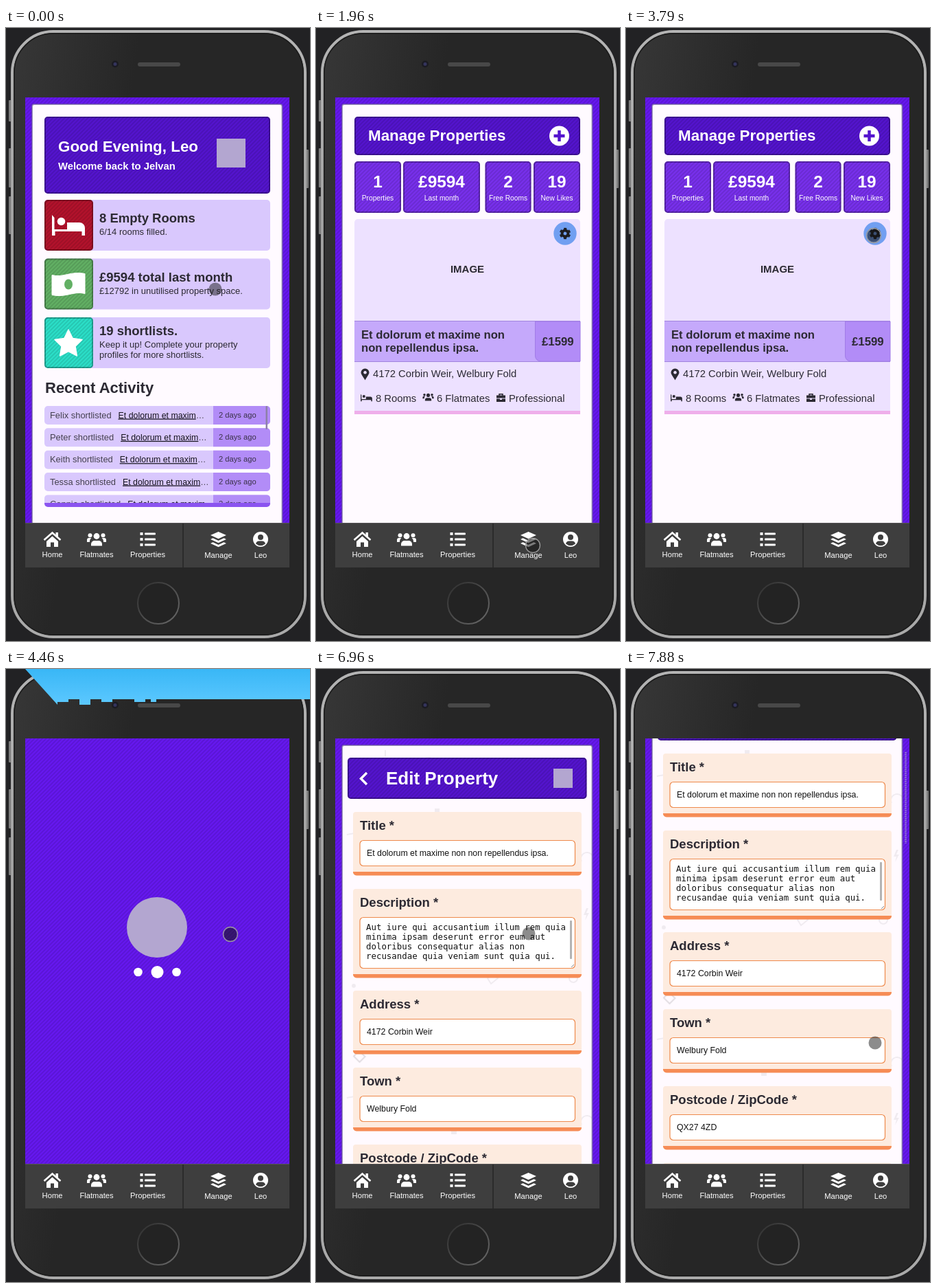
Recreate the animation shown at these times as an HTML page. Size 443 px wide and 892 px high, loop 8 s.

```html
<!DOCTYPE html>
<html lang="en">
<head>
<meta charset="utf-8">
<title>Room letting app</title>
<style>
html, body { margin: 0; width: 100%; height: 100%; overflow: hidden; background: #222224; }
svg { display: block; width: 443px; height: 892px; }
text { font-family: "Liberation Sans", Arial, sans-serif; white-space: pre; }
.mono { font-family: "DejaVu Sans Mono", monospace; }
</style>
</head>
<body>
<svg id="stage" viewBox="0 0 443 892"></svg>
<script>
const INK = '#2c2a33', DEEP = '#5414ce', LILAC = '#d9c8fd', PALE = '#ede1ff',
      MID = '#c5a9fb', STRONG = '#b28cf7', EDGE = '#8b54f0', NAV = '#3e3e3e', LOGO = '#b3a6d0', GREEN = '#62b064';
const STREET = '4172 Corbin Weir', TOWN = 'Welbury Fold', USER = 'Leo';

// Drawing helpers
const rect = (x, y, x2, y2, fill, r = 0, extra = '') =>
  `<rect x="${x}" y="${y}" width="${x2 - x}" height="${y2 - y}" rx="${r}" fill="${fill}" ${extra}/>`;
const striped = (x, y, x2, y2, fill, r = 0, extra = '') =>
  rect(x, y, x2, y2, fill, r) + rect(x, y, x2, y2, 'url(#stripes)', r, extra);
const panel = (x, y, x2, y2, fill) => striped(x, y, x2, y2, fill, 5) +
  rect(x + 1, y + 1, x2 - 1, y2 - 1, 'none', 4, 'stroke="#000" stroke-opacity=".28" stroke-width="2"');
const text = (x, y, size, str, fill = INK, extra = '') =>
  `<text x="${x}" y="${y}" font-size="${size}" fill="${fill}" ${extra}>${str}</text>`;
const bold = (x, y, size, str, fill = INK, extra = '') =>
  text(x, y, size, str, fill, 'font-weight="700" ' + extra);
const MIDDLE = 'text-anchor="middle"';
const circle = (x, y, r, fill, extra = '') => `<circle cx="${x}" cy="${y}" r="${r}" fill="${fill}" ${extra}/>`;
const icon = (name, x, y, fill = '#fff', scale = 1) =>
  `<g transform="translate(${x} ${y}) scale(${scale})" fill="${fill}" stroke="none" color="${fill}">${icons[name]}</g>`;
const path = (d, extra = '') => `<path d="${d}" ${extra}/>`;

const sidePerson = '<circle cx="-9.5" cy="-5.800" r="3"/>' + path('M-14 4V1a3 3 0 0 1 3-3h3.500a7 7 0 0 0-2.500 6z');
const starPoints = Array.from({ length: 10 }, (_, i) => {
  const r = i % 2 ? 10.5 : 21, a = i * Math.PI / 5;
  return `${r * Math.sin(a)},${-r * Math.cos(a)}`;
}).join(' ');
const icons = {
  home: path('M-12 1L0-9.500L12 1', 'fill="none" stroke="currentColor" stroke-width="2.6"') +
    path('M-8.500 3L0-4.500L8.500 3V11H2.500V4.500H-2.500V11H-8.500ZM5-10H8.500V-2L5-5Z'),
  users: '<circle cy="-4.500" r="4.400"/>' + path('M-8 9.500V7a5 5 0 0 1 5-5h6a5 5 0 0 1 5 5v2.500z') +
    sidePerson + `<g transform="scale(-1 1)">${sidePerson}</g>`,
  list: [-8, 0, 8].map(y => rect(-11, y - 2, -7, y + 2, 'currentColor') +
    rect(-4.5, y - 1.5, 11.5, y + 1.5, 'currentColor', 1)).join(''),
  layers: path('M0-11L11.500-6L0-.800L-11.500-6ZM-11.500 0L-8-1.700L0 2L8-1.700L11.500 0L0 5.200Z' +
    'M-11.500 6L-8 4.300L0 8L8 4.300L11.500 6L0 11.200Z'),
  user: circle(0, 0, 11, 'currentColor') + circle(0, -3, 4, NAV) + path('M-7 6.500Q-6 2.500-2 2.500H2Q6 2.500 7 6.500Q0 12-7 6.500Z', `fill="${NAV}"`),
  bed: path('M-24-15v30h4.500v-6h39v6h4.500v-11a8 8 0 0 0-8-8h-18v10h-18.500v-17z') + circle(-10.5, -5.5, 5.8, 'currentColor'),
  note: path('M-24-13.500C-8-9 4-20 24-15.500V13.500C8 9-4 20-24 15.500Z', 'stroke="currentColor" stroke-linejoin="round"') +
    `<ellipse rx="6" ry="7.400" fill="${GREEN}"/>`,
  star: `<polygon points="${starPoints}" stroke="currentColor" stroke-width="1.5" stroke-linejoin="round"/>`,
  gear: '<g transform="rotate(13.500)">' + circle(0, 0, 4.4, 'none', 'stroke="currentColor" stroke-width="4"') +
    circle(0, 0, 6.6, 'none', 'stroke="currentColor" stroke-width="3.200" stroke-dasharray="3.800 3.110"') + '</g>',
  pin: path('M0 8.500C-2 5-6-.500-6-2.500a6 6 0 0 1 12 0C6-.500 2 5 0 8.500ZM0-5a2.300 2.300 0 1 0 .1 0z', 'fill-rule="evenodd"'),
  bag: path('M-6.500-3.500H6.500V.500H-6.500ZM-6.500 1.500H-1.500V3H1.500V1.500H6.500V6H-6.500Z') +
    path('M-2.500-3V-5.200H2.500V-3', 'fill="none" stroke="currentColor" stroke-width="1.500"')
};

// Faint confetti that repeats down the page
const confetti = `<g fill="none" stroke="#000" stroke-opacity=".06" stroke-width="2">` +
  circle(164, 138, 9, 'none') + circle(375, 450, 6, 'none') +
  path('M101 118v10M241 156l15 10M343 211l4 18M45 241l11-2M387 280a9 9 0 1 1 17-3') +
  path('M63 172l8 9l-8 8l-8-8zM257 226l9 11l-9 12l-8-12zM107 256l15 9l-14 11zM360 140l7 16l-13 2zM257 442l8 8l-10 8l-5-8zM62 556l10 8l-8 8l-9-9z') +
  `<g fill="#000" fill-opacity=".06" stroke="none">${rect(173, 203, 180, 210, '#000')}${rect(197, 287, 205, 294, '#000')}` +
  circle(314, 285, 2.5, '#000') + circle(55, 461, 3, '#000') + path('M394 348l-4 10h4l-2 8l6-11h-4l3-7z') + '</g></g>';

const card = rect(38, 111, 402.5, 2000, '#fffaff', 3, 'stroke="#6b5a9c" stroke-opacity=".65" stroke-width="2"');

const summary = (y, colour, glyph, glyphY, title, lines) =>
  rect(56, y, 385, y + 74, LILAC, 5) + panel(56, y, 127, y + 74, colour) + icon(glyph, 91, glyphY) +
  bold(136, y + (lines.length > 1 ? 26 : 33), 18.5, title) +
  lines.map((s, i) => text(136, y + (lines.length > 1 ? 44 : 51) + i * 15, 13, s)).join('');

const activity = (name, i) => {
  const y = 550 + i * 32.35;
  return rect(56, y, 385, y + 27, LILAC, 5) + path(`M302 ${y}h78a5 5 0 0 1 5 5v17a5 5 0 0 1-5 5h-78z`, `fill="${STRONG}"`) +
    text(64, y + 17.5, 12.9, `${name} shortlisted<tspan dx="10" font-size="12.350" text-decoration="underline" fill="#15131c">Et dolorum et maxim</tspan><tspan font-size="12.350">…</tspan>`, '#45414f') +
    text(310, y + 16.5, 11.2, '2 days ago', '#3a3248');
};

const homePage = card + panel(56, 129, 385, 241, DEEP) +
  bold(76, 180, 22.4, `Good Evening, ${USER}`, '#fff') + bold(76, 206, 14.8, 'Welcome back to Jelvan', '#fff') +
  rect(307, 161, 349, 203, LOGO) +
  summary(250, '#b3122c', 'bed', 287, '8 Empty Rooms', ['6/14 rooms filled.']) +
  summary(335.5, GREEN, 'note', 373, '£9594 total last month', ['£12792 in unutilised property space.']) +
  summary(421, '#2bdfc8', 'star', 460, '19 shortlists.', ['Keep it up! Complete your property', 'profiles for more shortlists.']) +
  bold(57, 531, 22, 'Recent Activity') +
  `<g clip-path="url(#listClip)">${['Felix', 'Peter', 'Keith', 'Tessa', 'Connie'].map(activity).join('')}</g>` +
  path('M56 691H385V692a5 5 0 0 1-5 5H61a5 5 0 0 1-5-5z', `fill="${EDGE}"`) +
  rect(378.5, 550, 381, 584, '#8d80a8', 1, 'id="listBar"');

const stat = (x, x2, value, label) => panel(x, 194, x2, 269, '#7830ec') +
  bold((x + x2) / 2, 232, 24.4, value, '#fff', MIDDLE) + text((x + x2) / 2, 251, 10.2, label, '#fff', MIDDLE);

const managePage = card + panel(56, 129, 385, 185, DEEP) + bold(76, 164, 22.4, 'Manage Properties', '#fff') +
  circle(354.5, 157, 14.5, '#fff') + path('M354.500 149v16M346.500 157h16', `stroke="${DEEP}" stroke-width="4.500"`) +
  stat(56, 124, 1, 'Properties') + stat(127, 239, '£9594', 'Last month') +
  stat(246.5, 313.5, 2, 'Free Rooms') + stat(317, 385, 19, 'New Likes') +
  rect(56, 278, 385, 440, PALE, 5) + bold(220.5, 356, 15, 'IMAGE', INK, MIDDLE) +
  circle(363, 299, 16.7, '#719ff1') + icon('gear', 363, 299, '#1d1d22') +
  rect(56, 426, 385, 557, PALE) + rect(56, 426.5, 385, 485.5, MID) +
  path('M56 426.500H385M56 485.500H385', 'stroke="#a184dd"') +
  path('M319.500 427H385V485H327.500a8 8 0 0 1-8-8z', `fill="${STRONG}" stroke="#a07ce6"`) +
  bold(66, 452, 16.65, 'Et dolorum et maxime non') + bold(66, 471, 16.65, 'non repellendus ipsa.') +
  bold(329, 462, 16.8, '£1599') +
  icon('pin', 71.5, 504, INK) + text(83, 508, 14.8, `${STREET}, ${TOWN}`) +
  icon('bed', 73.5, 538, INK, .35) + text(87, 544, 14.8, '8 Rooms') +
  icon('users', 163.5, 537, INK, .58) + text(176, 544, 14.8, '6 Flatmates') +
  icon('bag', 269.5, 538, INK) + text(281, 544, 14.8, 'Professional') +
  rect(56, 557, 385, 562, '#efaeea');

const splashPage = circle(220, 376, 44, LOGO) +
  [0, 1, 2].map(i => circle(192.5 + i * 28, 441, 6, '#fff', 'class="dot"')).join('');

const chip = (x, x2) => rect(x, 390, x2, 424, '#f5c9fc', 3) + rect(x, 390, x + 3, 424, '#d444dc', 1);

const viewPage = card + rect(37, 110, 404, 312, PALE, 3) + `<g clip-path="url(#photoClip)">${confetti}</g>` +
  rect(37, 311.5, 404, 314.5, MID) + text(220.5, 215, 14.7, 'IMAGE', INK, MIDDLE) +
  circle(378, 134.5, 16.5, '#719ff1') + icon('gear', 378, 134.5) +
  rect(56, 329, 385, 446, MID, 5) + bold(66, 362, 21.7, '£1599 per Month') + text(242, 360, 11.15, '( +£864 deposit )') +
  chip(65, 184) + chip(194, 283) + chip(292, 366) +
  text(76, 412, 12.9, 'Ages:') + path('M112.500 405h8l-4 4.500zM168.500 410h8l-4-4.500z', `fill="${INK}"`) +
  text(125, 412, 12.9, '47 - 49') + text(204, 412, 12.9, 'Flatmates: 6') + text(302, 412, 12.9, 'Rooms: 8') +
  rect(56, 442, 385, 526, STRONG) + rect(56, 442, 385, 444, '#9769f1') + rect(56, 477, 385, 478, '#b896f8') +
  text(65.5, 465, 14.8, 'Mostly Professional House') + text(65.5, 498, 14.8, 'Mixed Household: 3 Men · 3 Women') +
  rect(56, 520, 385, 526, EDGE) + rect(56, 540, 385, 545, EDGE) +
  rect(56, 545, 385, 579, MID) + bold(65.5, 571, 24, 'About') + rect(56, 579, 385, 715, STRONG) +
  text(65.5, 601, 18.5, 'Et dolorum et maxime non non') + text(65.5, 616, 18.5, 'repellendus ipsa.') +
  ['Aut iure qui accusantium illum rem quia', 'minima ipsam deserunt error eum aut',
   'doloribus consequatur alias non recusandae', 'quia veniam sunt quia qui.']
    .map((s, i) => text(65.5, 648 + i * 14.7, 14.8, s)).join('') +
  rect(56, 715, 385, 721, '#9769f1');

const field = (y, label, value, inner = 37) => {
  const bottom = y + inner + 50;
  return path(`M54 ${y + 4}a4 4 0 0 1 4-4H383a4 4 0 0 1 4 4V${bottom}H54z`, 'fill="#fdebdf"') +
    path(`M54 ${bottom}H387a5 5 0 0 1-5 5.500H59a5 5 0 0 1-5-5.500z`, 'fill="#f68c55"') +
    bold(64, y + 26, 18.5, label + ' *') +
    rect(64, y + 41.5, 377.5, y + 41.5 + inner, '#fff', 5, 'stroke="#ee8a4c" stroke-width="1.200"') +
    (Array.isArray(value)
      ? value.map((s, i) => text(73, y + 60 + i * 14, 12.4, s, '#111', 'class="mono"')).join('') +
        rect(370, y + 46, 373, y + 102, '#b3b3b3', 1) + path(`M372 ${y + 114}l4-4`, 'stroke="#888"')
      : text(74, y + 64, 12.35, value, '#111'));
};

const editPage = card + `<g clip-path="url(#cardClip)">${confetti}<g transform="translate(0 383)">${confetti}</g></g>` +
  panel(46, 129, 394.5, 189, DEEP) + path('M74 151l-8.500 8.500l8.500 8.500', 'fill="none" stroke="#fff" stroke-width="3.500"') +
  bold(102, 168, 26, 'Edit Property', '#fff') + rect(346, 145, 374, 173, LOGO) +
  field(208, 'Title', 'Et dolorum et maxime non non repellendus ipsa.') +
  field(320, 'Description', ['Aut iure qui accusantium illum rem quia', 'minima ipsam deserunt error eum aut',
    'doloribus consequatur alias non', 'recusandae quia veniam sunt quia qui.'], 74) +
  field(468, 'Address', STREET) + field(580, 'Town', TOWN) + field(692, 'Postcode / ZipCode', 'QX27 4ZD') +
  field(803.5, 'Country', '');

const tab = (x, glyph, label, dy = 0) => icon(glyph, x, 744) + text(x, 770 + dy, 11.2, label, '#fff', MIDDLE);

const pages = { home: homePage, manage: managePage, splash: splashPage, view: viewPage, edit: editPage };

const clip = (id, x, y, x2, y2) => `<clipPath id="${id}">${rect(x, y, x2, y2, '#000')}</clipPath>`;
document.getElementById('stage').innerHTML = `<defs>
  <pattern id="stripes" width="4" height="4" patternUnits="userSpaceOnUse" patternTransform="rotate(45)">${rect(0, 0, 2, 4, '#000', 0, 'opacity=".11"')}</pattern>
  <linearGradient id="metal" x2="0" y2="1"><stop stop-color="#b4b4b4"/><stop offset=".5" stop-color="#969696"/><stop offset="1" stop-color="#aaa"/></linearGradient>
  <linearGradient id="body" x2=".8" y2=".25"><stop stop-color="#373737"/><stop offset=".5" stop-color="#262626"/></linearGradient>
  <linearGradient id="button" y2="1"><stop stop-color="#2e2e2e"/><stop offset="1" stop-color="#6a6a6a"/></linearGradient>
  <linearGradient id="sky" x2="0" y2="1"><stop stop-color="#39b7f6"/><stop offset="1" stop-color="#5cc8ff"/></linearGradient>
  ${clip('screen', 28, 101, 413, 720)}${clip('listClip', 56, 549, 386, 691)}
  ${clip('photoClip', 38, 111, 403, 311)}${clip('cardClip', 38, 111, 402, 2000)}</defs>` +
  rect(0, 0, 443, 892, '#222224') +
  [[105, 136], [175, 232], [245, 300]].map(([a, b]) => rect(4, a, 8, b, '#7c7c7c', 1)).join('') + rect(436, 177, 441, 233, '#7c7c7c', 1) +
  rect(9, 5, 436, 886, 'url(#body)', 60, 'stroke="url(#metal)" stroke-width="4"') +
  rect(12, 8, 433, 883, 'none', 57, 'stroke="#1c1c1c" stroke-width="1.500"') +
  circle(159, 52.5, 5, '#1b1b22') + circle(159, 52.5, 2.5, '#34345c') + rect(192, 50, 254, 56, '#484848', 3) +
  circle(222, 837, 30, '#232323', 'stroke="url(#button)" stroke-width="2"') +
  `<g clip-path="url(#screen)">${striped(28, 101, 413, 720, '#6618f0')}` +
  Object.entries(pages).map(([id, body]) => `<g id="${id}">${body}</g>`).join('') +
  path('M407.500 0v133', 'id="pageBar" stroke="#a79bd0" stroke-width="2.500" stroke-dasharray="2 1" opacity=".7"') + '</g>' +
  rect(28, 720, 413, 785, NAV) + rect(257, 720, 259, 785, '#2b2b2b') + rect(28, 720, 413, 721, '#555') +
  tab(67.5, 'home', 'Home') + tab(132, 'users', 'Flatmates') + tab(206.5, 'list', 'Properties') +
  tab(309.5, 'layers', 'Manage', 1) + tab(371, 'user', USER, 1) +
  path('M28 0H443V44H219V48H211V44H203V48H187V44H155V48H139V44H123V52H107V44H91V48H75V52Z', 'id="flash" fill="url(#sky)"') +
  `<g id="cursor">${circle(0, 0, 9.5, '#191919', 'fill-opacity=".5"')}` +
  circle(0, 0, 10.5, '#000', 'id="ring" fill-opacity=".12" stroke="#999" stroke-width="1.300"') + '</g>';

// Pointer stops: time, x, y
const stops = [[0, 305, 380], [235, 305, 380], [262, 316, 381], [290, 302, 380], [480, 302, 380], [500, 303, 376],
  [640, 303, 376], [1000, 287, 669], [1669, 287, 669], [1670, 316, 753], [2190, 316, 753], [2670, 262, 393],
  [3270, 262, 393], [3790, 361, 302], [4100, 361, 302], [4460, 327, 386], [4750, 309, 472], [5360, 309, 472],
  [5830, 372, 135], [6130, 372, 135], [6880, 310, 385], [6960, 310, 385], [7250, 325, 400], [7410, 325, 400],
  [7880, 363, 544], [8000, 363, 544]];
const schedule = [[1920, 'home'], [3960, 'manage'], [4720, 'splash'], [6210, 'view'], [8000, 'edit']];

const $ = id => document.getElementById(id);
const dots = document.querySelectorAll('.dot');
const show = (id, on) => { $(id).style.display = on ? '' : 'none'; };
const within = (t, a, b) => t >= a && t < b;
const ease = (t, a, b) => { const u = Math.min(1, Math.max(0, (t - a) / (b - a))); return u * u * (3 - 2 * u); };

function render(t) {
  const current = schedule.find(([end]) => t < end)[1];
  Object.keys(pages).forEach(id => show(id, id === current));

  const k = stops.findIndex(s => s[0] > t), [t0, x0, y0] = stops[k - 1], [t1, x1, y1] = stops[k];
  const u = ease(t, t0, t1);
  $('cursor').setAttribute('transform', `translate(${x0 + (x1 - x0) * u} ${y0 + (y1 - y0) * u})`);
  show('ring', within(t, 1880, 2210) || within(t, 3780, 4500) || within(t, 5820, 6130));

  $('listBar').setAttribute('opacity', 1 - ease(t, 670, 900));
  dots.forEach((dot, i) => dot.setAttribute('r', 7.2 + 1.8 * Math.cos(2 * Math.PI * ((t - 4460) / 1000 - (i - 1) / 3))));
  show('flash', within(t, 2380, 2460) || within(t, 4420, 4500));

  const scroll = 85 * ease(t, 7400, 7880);
  $('edit').setAttribute('transform', `translate(0 ${-scroll})`);
  $('pageBar').setAttribute('transform', `translate(0 ${103 + scroll * .21})`);
  show('pageBar', t >= 7420);
}

(function tick() {
  render(performance.now() % 8000);
  requestAnimationFrame(tick);
})();
</script>
</body>
</html>
```
